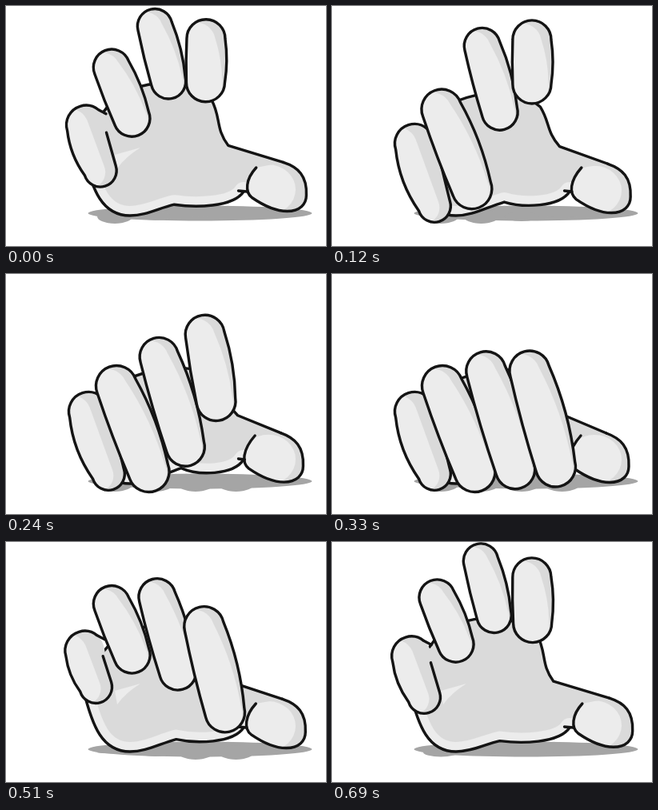
Recreate the animation shown at these times as an HTML page with a canvas. Size 400 px wide and 300 px high, loop 0.72 s.

```html
<!DOCTYPE html>
<html lang="en">
<head>
<meta charset="utf-8">
<title>Drumming fingers</title>
<style>
  html, body { margin: 0; width: 100%; height: 100%; overflow: hidden; background: #fff; }
  canvas { display: block; width: 400px; height: 300px; }
</style>
</head>
<body>
<canvas id="stage" width="400" height="300"></canvas>
<script>
const ctx = document.getElementById('stage').getContext('2d');
const LOOP = 720, STEP = 30, QUARTER = Math.PI / 2;
const INK = '#141414', LIGHT = '#ececec', SHADE = '#dadada', SHADOW = '#a5a5a5';

// Joint centres, radius raised and resting, and the times of one drum stroke in ms
const fingers = [
  { tip: [98, 133], end: [111, 176], restTip: [103, 172], size: [24.5, 24.5], lift: 343, peak: 570, drop: 585, land: 798 },
  { tip: [130.5, 60], end: [151.5, 112], restTip: [138, 140], size: [22, 25.5], lift: 417, peak: 591, drop: 603, land: 858 },
  { tip: [186, 23.5], end: [202.5, 91.5], restTip: [192.5, 121.5], size: [21.7, 24.7], lift: 444, peak: 650, drop: 678, land: 990 },
  { tip: [250, 39.5], end: [249, 93.5], restTip: [247, 121], size: [24, 25], lift: 483, peak: 753, drop: 798, land: 1041 }
];
const plain = { taper: 1, bulgeLeft: 0.02, bulgeRight: 0.075, shadeTip: 12, shadeEnd: 3 };
const curved = { taper: 0.83, bulgeLeft: 0.13, bulgeRight: 0, shadeTip: 21, shadeEnd: 14, open: true };
fingers.forEach((f, i) => Object.assign(f, i ? plain : curved, { restEnd: [128 + 50.5 * i, 250 - 3 * i] }));

const lerp = (a, b, k) => a + (b - a) * k;
const mix = (a, b, k) => a.map((v, i) => lerp(v, b[i], k));

// 0 is raised, 1 rests on the ground
function pressAt({ lift, peak, drop, land }, t) {
  if (t < land - LOOP) t += LOOP;
  if (t < lift) return 1;
  if (t < peak) return ((peak - t) / (peak - lift)) ** 2;
  return t < drop ? 0 : ((t - drop) / (land - drop)) ** 2;
}

function ellipse(color, x, y, rx, ry) {
  ctx.fillStyle = color;
  ctx.beginPath();
  ctx.ellipse(x, y, rx, ry, 0, 0, 7);
  ctx.fill();
}

// Two round ends joined by slightly swollen sides
function fingerPath(f, [tx, ty], [ex, ey], r, open) {
  const a = Math.atan2(ey - ty, ex - tx), endR = r * f.taper;
  const nx = Math.cos(a - QUARTER), ny = Math.sin(a - QUARTER);
  const length = Math.hypot(ex - tx, ey - ty);
  const side = (x, y, out) => [x + nx * out, y + ny * out];
  const belly = out => side((tx + ex) / 2, (ty + ey) / 2, out);
  const half = (r + endR) / 2;

  ctx.beginPath();
  ctx.arc(ex, ey, endR, a - QUARTER, a + QUARTER);
  ctx.quadraticCurveTo(...belly(-half - f.bulgeLeft * length), ...side(tx, ty, -r));
  if (open) {
    ctx.arc(tx, ty, r, a + QUARTER, Math.PI * 1.72);
    ctx.lineTo(tx + 25, ty - 14);
    ctx.moveTo(...side(lerp(tx, ex, 0.28), lerp(ty, ey, 0.28), r - open));
    ctx.lineTo(...side(ex, ey, endR));
  } else {
    ctx.arc(tx, ty, r, a + QUARTER, a + 3 * QUARTER);
    ctx.quadraticCurveTo(...belly(half + f.bulgeRight * length), ...side(ex, ey, endR));
  }
}

function drawFinger(f, press) {
  const tip = mix(f.tip, f.restTip, press), end = mix(f.end, f.restEnd, press);
  const r = lerp(...f.size, press);
  ctx.save();
  fingerPath(f, tip, end, r);
  ctx.fillStyle = SHADE;
  ctx.fill();
  ctx.clip();
  fingerPath(f, [tip[0] - f.shadeTip, tip[1] + 4], [end[0] - f.shadeEnd, end[1] + 2], r);
  ctx.fillStyle = LIGHT;
  ctx.fill();
  ctx.restore();
  fingerPath(f, tip, end, r, f.open && 5 * (1 - press) + 0.01);
  ctx.stroke();
}

function drawShadow(press) {
  ellipse(SHADOW, 242.5, 259, 140, 9.5);
  fingers.forEach((f, i) => ellipse(SHADOW, f.restEnd[0] + 8, 263, 22, 9 * Math.min(1, press[i] * 2.5)));
}

// k: 0 open hand, 1 closed hand
function palmTop(k) {
  ctx.moveTo(122, 130 + 20 * k);
  ctx.bezierCurveTo(150, 84 + 46 * k, 225, 84 + 18 * k, 256 + 8 * k, 115 + 20 * k);
  ctx.bezierCurveTo(268 + 8 * k, 138 + 14 * k, 260 + 14 * k, 152 + 8 * k, 276 + 15 * k, 174 + 3 * k);
  ctx.lineTo(347 - 4 * k, 195 + 4 * k);
}

function palmBottom(k) {
  const x = 209 + 11 * k, y = 249 - 7 * k;
  ctx.lineTo(297, 232);
  ctx.bezierCurveTo(284, 252, 235 + 5 * k, 252, x, y);
  ctx.bezierCurveTo(190, 253, 175, 262, 155, 262);
  ctx.bezierCurveTo(120, 262, 108, 230, 97, 186);
}

function thumbTip(k) {
  const x = -5 * k, y = 4.5 * k;
  ctx.moveTo(313 - 2 * k, 202);
  ctx.bezierCurveTo(300 + x, 216 + y, 299 + x, 232 + y, 308 + x, 239 + y);
  ctx.bezierCurveTo(324 + x, 250 + y, 340 + x, 256 + y, 352 + x, 256 + y);
  ctx.bezierCurveTo(368 + x, 256 + y, 376 + x, 247 + y, 376 + x, 236 + y);
  ctx.bezierCurveTo(377 + x, 212 + y, 366 + x, 201 + y, 347 - 4 * k, 195 + 4 * k);
}

function strokePart(part, k) {
  ctx.beginPath();
  part(k);
  ctx.stroke();
}

// Fills the current path in shade and paints the light inside it
function fillLit(paintLight) {
  ctx.save();
  ctx.fillStyle = SHADE;
  ctx.fill();
  ctx.clip();
  ctx.fillStyle = ctx.strokeStyle = LIGHT;
  paintLight();
  ctx.restore();
}

function drawPalm(k) {
  ctx.beginPath();
  palmTop(k);
  palmBottom(k);
  fillLit(() => {
    ctx.lineWidth = 24;
    strokePart(palmBottom, k);
    ctx.beginPath();
    ctx.moveTo(136, 186);
    ctx.lineTo(168, 177);
    ctx.quadraticCurveTo(150, 188, 139, 203);
    ctx.fill();
  });

  ctx.beginPath();
  thumbTip(k);
  fillLit(() => ellipse(LIGHT, 328, 229 + 3 * k, 34, 31));

  [palmTop, palmBottom, thumbTip].forEach(part => strokePart(part, k));
  ctx.beginPath();
  ctx.moveTo(290.5, 231);
  ctx.lineTo(302 - 4 * k, 232);
  ctx.stroke();
}

function draw(now) {
  const t = Math.floor(now / STEP) * STEP % LOOP;
  const press = fingers.map(f => pressAt(f, t));
  ctx.fillStyle = '#fff';
  ctx.fillRect(0, 0, 400, 300);
  ctx.strokeStyle = INK;
  ctx.lineWidth = 3.4;
  ctx.lineCap = ctx.lineJoin = 'round';
  drawShadow(press);
  drawPalm((press[1] + press[2]) / 2);
  fingers.forEach((f, i) => drawFinger(f, press[i]));
}

function tick(now) {
  draw(now);
  requestAnimationFrame(tick);
}
draw(0);
requestAnimationFrame(tick);
</script>
</body>
</html>
```
